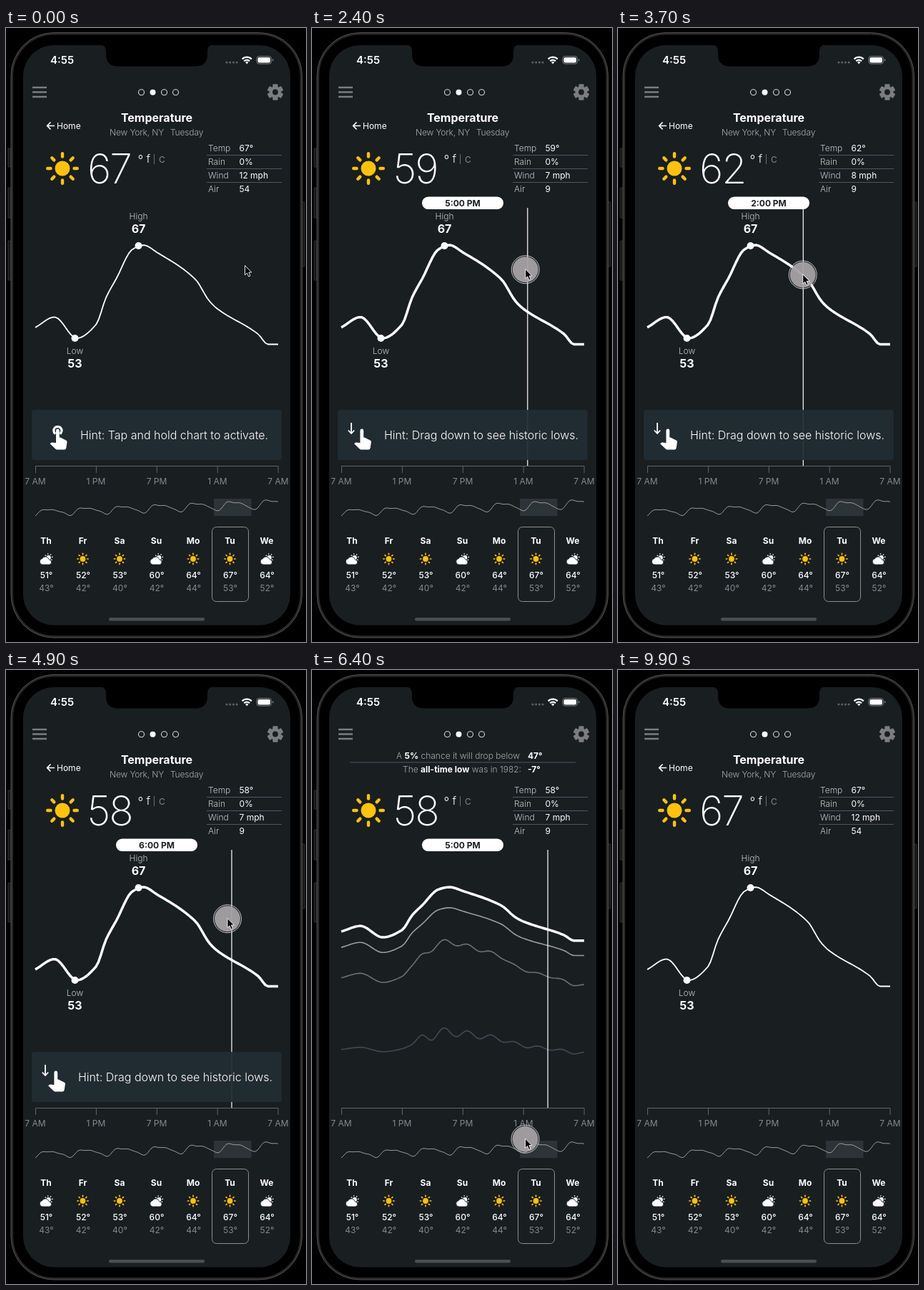
Recreate the animation shown at these times as an HTML page. Size 420 by 857 pixels, loop 10 s.

```html
<!DOCTYPE html>
<html lang="en">
<head>
<meta charset="utf-8">
<title>Weather chart</title>
<style>
  html, body { margin: 0; width: 100%; height: 100%; overflow: hidden; background: #000; }
  svg { display: block; width: 420px; height: 857px; font: 12px Inter, Roboto, sans-serif; fill: #fff; }
  .mid { text-anchor: middle; }
  .end { text-anchor: end; }
  .bold { font-weight: 700; }
  .light { font-weight: 300; }
  .soft { fill: #c4c6c8; }
  .dim { fill: #85898c; }
  .note { fill: #a9acae; font-weight: 300; }
  .line { fill: none; stroke: #fff; stroke-linejoin: round; }
  .rule { stroke: #50565a; }
  .title { font-size: 16px; font-weight: 700; }
  .hint { font-size: 16px; font-weight: 300; }
</style>
</head>
<body>
<svg id="stage" viewBox="0 0 420 857"></svg>
<script>
const LOOP = 10000, STEP = 100;
const LEFT = 41, WIDTH = 340, HOUR = WIDTH / 24, TOP = 303;
const BG = "#191e21";

// Key points of the day's curve: hour, y
const dayKeys = [[0, 418], [1.9, 403.5], [4.1, 433], [6, 414], [7, 376], [8, 350], [9.6, 309], [10.7, 303],
  [12, 313], [15.8, 350.5], [17.2, 381], [18, 392], [22, 427], [23, 441.5], [24, 441.5]];
// Historic lows flatten the day's curve and add a ripple
const lowLines = [
  { base: 330, slope: .485, ripple: 0, color: "#9a9da0" },
  { base: 375, slope: .44, ripple: 4.5, color: "#6b7073" },
  { base: 493, slope: .23, ripple: 7, color: "#43494c" }];
const days = [["Th", 51, 43, true], ["Fr", 52, 42], ["Sa", 53, 40], ["Su", 60, 42, true],
  ["Mo", 64, 44], ["Tu", 67, 53], ["We", 64, 52, true]];
// Pointer moves: start, end, x, y
const moves = [[0, 400, 345, 338], [600, 1300, 329.5, 335.5], [2100, 3200, 161, 341],
  [3200, 4000, 304, 345], [4100, 4500, 310, 346.5], [5100, 6000, 298.5, 654]];

// Motion helpers
const $ = id => document.getElementById(id);
const ramp = (t, a, b) => Math.max(0, Math.min(1, (t - a) / (b - a)));
const smooth = p => p * p * (3 - 2 * p);
const ease = (t, a, b) => smooth(ramp(t, a, b));
const mix = (a, b, p) => a + (b - a) * p;
const set = (id, attrs) => { for (const k in attrs) $(id).setAttribute(k, attrs[k]); };
const fade = (id, opacity) => set(id, { opacity });
const write = (id, s) => { if ($(id).textContent !== s) $(id).textContent = s; };

// Curves
const secant = i => (dayKeys[i + 1][1] - dayKeys[i][1]) / (dayKeys[i + 1][0] - dayKeys[i][0]);
function slopeAt(i) {
  const a = secant(Math.max(0, i - 1)), b = secant(Math.min(dayKeys.length - 2, i));
  return a * b <= 0 ? 0 : 2 * a * b / (a + b);
}
function dayY(hour) {
  const i = Math.max(0, dayKeys.findIndex(key => key[0] >= hour) - 1);
  const [h0, y0] = dayKeys[i], [h1, y1] = dayKeys[i + 1];
  const span = h1 - h0, p = (hour - h0) / span, q = 1 - p;
  return mix(y0, y1, smooth(p)) + span * p * q * (q * slopeAt(i) - p * slopeAt(i + 1));
}
function lowY({ base, slope, ripple }, hour) {
  const wave = Math.cos((hour - 9) * 2 * Math.PI / 2.33) * Math.exp(-ramp(hour, 9, 24) * 1.8);
  return base + slope * (dayY(hour) - TOP) + ripple * wave * ease(hour, 6, 8.5);
}
function weekY(x) {
  const u = (x - LEFT) / WIDTH, a = (x - 55) * 2 * Math.PI / 51.6;
  return 677 - 12 * u - (4.5 + 2 * u) * Math.cos(a + .66 * (Math.cos(a) - 1)) + .6 * Math.sin(x * .36);
}
const plot = (f, from, to, step) => "M" + Array.from({ length: Math.round((to - from) / step) + 1 },
  (_, i) => from + i * step).map(f).join("L");
const plotDay = f => plot(h => [LEFT + h * HOUR, f(h).toFixed(2)], 0, 24, .25);

// Drawing helpers
const text = (x, y, s, cls = "", more = "") => `<text x="${x}" y="${y}" class="${cls}" ${more}>${s}</text>`;
const rect = (x, y, w, h, r, more = "") =>
  `<rect x="${x}" y="${y}" width="${w}" height="${h}" rx="${r}" ${more}/>`;
const circle = (x, y, r, more = "") => `<circle cx="${x}" cy="${y}" r="${r}" ${more}/>`;
const rule = (x1, x2, y) => `<path class="rule" d="M${x1} ${y}H${x2}"/>`;
const list = (n, f) => Array.from({ length: n }, (_, i) => f(i)).join("");

const sun = (x, y, scale) => `<g transform="translate(${x} ${y}) scale(${scale})" fill="#ffc20e">
  ${circle(0, 0, 10.5)}${list(8, i =>
    `<path d="M0 -16.5V-20.8" stroke="#ffc20e" stroke-width="4.4" stroke-linecap="round" transform="rotate(${i * 45})"/>`)}</g>`;

const cloud = (x, y) => `<g transform="translate(${x} ${y})">
  ${circle(3.6, -2.2, 3.2)}${list(5, i =>
    `<path d="M3.6 -6.6V-8.2" stroke="#fff" stroke-width="1.3" transform="rotate(${i * 45 - 55} 3.6 -2.2)"/>`)}
  <path d="M-5 7.5a4.2 4.2 0 0 1-.4-8.3a5.2 5.2 0 0 1 9.6 1.2a3.6 3.6 0 0 1 .6 7.1z" stroke="${BG}" stroke-width=".8"/></g>`;

const hand = (x, y, more = "") => `<g transform="translate(${x} ${y}) scale(1.6)">
  <path d="M10 18.2V7.5a1.5 1.5 0 0 1 3 0v6h.8l5 2.4q1 .5 .9 1.6l-.8 5.2q-.2 1.3-1.4 1.3h-6.8q-.6 0-1-.4L4.8 18.9l.8-.8q.5-.5 1-.3z"/>${more}</g>`;
const touchRing = '<path class="line" stroke-width="2" d="M9.500 10.300A3.500 3.500 0 1 1 13.500 10.300"/>'.replace(/00/g, "");

const gear = (x, y) => `<g transform="translate(${x} ${y})" fill="#7b7d7f">
  ${list(6, i => rect(-3.6, -11.2, 7.2, 8, 1.2, `transform="rotate(${i * 60})"`))}
  ${circle(0, 0, 8.2)}${circle(0, 0, 3.9, `fill="${BG}"`)}</g>`;

const phone = () => `
  <g fill="#171717" stroke="#3c3c3c" stroke-width=".8">
    ${rect(3, 168, 4, 26, 1)}${rect(3, 223, 4, 42, 1)}${rect(3, 297, 4, 55, 1)}${rect(414, 243, 4, 90, 1)}
  </g>
  ${rect(7, 6.5, 407.5, 844.5, 60, 'fill="#282828" stroke="#505050"')}
  ${rect(10, 9.5, 401.5, 838.5, 57, 'fill="#000"')}
  ${rect(24, 24, 374, 809.5, 43, `fill="${BG}"`)}
  <path fill="#000" d="M132 23.5Q140 24 140 32V37Q140 53.5 157 53.5H265Q282 53.5 282 37V32Q282 24 290 23.5Z"/>
  ${text(62, 50, "4:55", "", 'font-size="15" font-weight="600"')}
  ${list(4, i => circle(309 + i * 4.7, 48, 1.6, 'fill="#5c6063"'))}
  <path class="line" stroke-width="2.3" d="M330.6 43.4a9.2 9.2 0 0 1 13.2 0M333.3 46.2a5.5 5.5 0 0 1 7.8 0"/>
  <path d="M335 47.8a3.1 3.1 0 0 1 4.4 0L337.2 50.2z"/>
  ${rect(351, 39.5, 20.5, 10.5, 3.2, 'fill="none" stroke="#7d8183"')}${rect(352.5, 41, 17.5, 7.5, 2)}
  <path d="M373 43v3.6q1.6-.6 1.6-1.8t-1.6-1.8" fill="#7d8183"/>
  <path d="M37 83H57M37 89.5H57M37 96H57" stroke="#7b7d7f" stroke-width="2.4"/>
  ${list(4, i => circle(189.5 + 16 * i, 89.7, 4, i === 1 ? "" : 'fill="none" stroke="#d5d7d8" stroke-width="1.1"'))}
  ${gear(377, 89.5)}
  ${rect(144, 823, 134, 4.5, 2.2, 'fill="#4a4f52"')}`;

const header = () => `
  <path class="line" stroke-width="1.7" d="M68 136.5H57.5M62.5 131.5L57.5 136.5L62.5 141.5"/>
  ${text(71, 140.5, "Home")}
  ${text(211, 131, "Temperature", "mid title")}
  <g letter-spacing="-.15">${text(145, 150, "New York, NY", "note")}${text(230, 150, "Tuesday", "note")}</g>
  ${sun(79, 196, 1)}
  ${text(114, 217.3, "", "", 'id="bigTemp" font-size="57" font-weight="200" letter-spacing="-2"')}
  ${text(184.5, 190, "°", "light", 'font-size="17"')}
  ${text(196.5, 187.5, "f", "light", 'font-size="16"')}
  <path d="M207.5 176V190" stroke="#686d70"/>
  ${text(214, 187.5, "C", "dim")}
  ${["Temp", "Rain", "Wind", "Air"].map((name, i) =>
    text(283, 172 + 19 * i, name, "light soft") + text(326.5, 172 + 19 * i, "", "", `id="cell${i}"`) +
    (i < 3 ? rule(281, 386, 177.5 + 19 * i) : "")).join("")}`;

const history = () => {
  const b = s => `<tspan fill="#fff" font-weight="700">${s}</tspan>`;
  const row = (x, y, s, value) => text(x, y, s, "end note") + text(302, y, value, "bold");
  return `<clipPath id="panelClip">${rect(25, 113, 372, 120, 0)}</clipPath>
  <g clip-path="url(#panelClip)"><g id="panel">
    ${rect(25, 112, 372, 120, 0, `fill="${BG}"`)}
    ${text(211, 131, "Historic Lows", "mid title")}
    ${text(211, 157.5, `At ${b("5:00 PM")} in early November`, "mid note")}${rule(124, 298, 162.5)}
    ${row(291, 176.5, `There is a ${b("10%")} chance it will drop below`, "55°")}${rule(53, 369, 181.5)}
    ${row(291, 195, `A ${b("5%")} chance it will drop below`, "47°")}${rule(53, 369, 199.5)}
    ${row(293, 214, `The ${b("all-time low")} was in 1982:`, "-7°")}
  </g></g>`;
};

const marker = (x, y, name, value, nameY) =>
  circle(x, y, 5) + text(x, nameY, name, "mid light soft") + text(x, nameY + 18.5, value, "mid bold", 'font-size="16"');

const chart = () => `
  <g id="lows" class="line">${lowLines.map((low, i) =>
    `<path id="low${i}" stroke="${low.color}" stroke-width="1.6"/>`).join("")}</g>
  <path id="curve" class="line"/>
  <g id="markers">${marker(185.5, 304, "High", "67", 267)}${marker(96.5, 433, "Low", "53", 455)}</g>
  <g id="probe">
    <path id="probeLine" class="line" stroke-width="1.2" d="M0 251V612"/>
    ${rect(154, 235.5, 114, 17.5, 8.7)}
    ${text(211, 248.7, "", "mid bold", `id="probeTime" fill="${BG}"`)}
  </g>
  <g id="hint">
    ${rect(36, 533, 350, 70, 4, 'fill="#222d34" fill-opacity=".93"')}
    <g id="hintHold">${hand(54, 550, touchRing)}
      ${text(104, 574, "Hint: Tap and hold chart to activate.", "hint")}</g>
    <g id="hintDrag">${hand(51.4, 550)}
      <path class="line" stroke-width="1.8" d="M55 551V565M50.8 561.5L55 566L59.2 561.5"/>
      ${text(101, 574, "Hint: Drag down to see historic lows.", "hint")}</g>
  </g>
  <path class="line" style="stroke:#5f6568" d="M41 611.5H381${list(5, i => `M${41.5 + 84.9 * i} 611.5V621`)}"/>
  ${["7 AM", "1 PM", "7 PM", "1 AM", "7 AM"].map((s, i) => text(41 + 85 * i, 636.5, s, "mid dim")).join("")}
  ${rect(291, 657, 52.5, 24, 0, 'fill="#2c3437"')}
  <path class="line" style="stroke:#a3a6a8" stroke-width=".9" d="${plot(x => [x, weekY(x)], LEFT, LEFT + WIDTH, 2)}"/>`;

const forecast = () => rect(288.5, 696.5, 51, 104, 6, 'fill="none" stroke="#8b8f91"') +
  days.map(([name, high, low, cloudy], i) => {
    const x = 56 + 51.5 * i;
    return text(x, 720, name, "mid bold") + (cloudy ? cloud(x, 741.5) : sun(x, 741, .37)) +
      text(x + .5, 767.5, high + "°", "mid", 'font-weight="500"') + text(x + .5, 785.5, low + "°", "mid dim");
  }).join("");

const pointer = () => `<g id="pointer">
  <g id="press">${circle(0, .7, 18, 'fill="#a6a2a5" fill-opacity=".95"')}
    ${circle(0, .7, 19.5, 'fill="none" stroke="#c9c6c8"')}</g>
  <path d="M0 0V13.2L3 10.4L5.2 15.4L7.5 14.4L5.4 9.5H9.4Z" fill="#000" stroke="#fff" stroke-width=".9"/></g>`;

$("stage").innerHTML = phone() + header() + history() + chart() + forecast() + pointer();

function pointerAt(t) {
  let x = 334.5, y = 331.5;
  for (const [start, end, toX, toY] of moves) {
    const p = ease(t, start, end);
    x = mix(x, toX, p);
    y = mix(y, toY, p);
  }
  return [x, y];
}

// The probe line snaps to whole hours; pulling down fixes it at 5 PM
function drawReadings(t, x) {
  const pulled = t >= 5600, active = t >= 1800 && t < 8100;
  const slot = pulled ? 20 : Math.round((x - 40) / HOUR);
  const hour = pulled ? 17 : slot - 1;
  const since9 = pulled ? 9 : hour - 9;
  const temp = active ? Math.round(66 - since9 * 8 / 9) : 67;
  const wind = active ? Math.round(10 - since9 / 3) : 12;
  write("bigTemp", String(temp));
  [temp + "°", "0%", wind + " mph", active ? "9" : "54"].forEach((s, i) => write("cell" + i, s));
  write("probeTime", `${(hour + 11) % 12 + 1}:00 ${hour < 12 ? "AM" : "PM"}`);
  set("probeLine", { transform: `translate(${46.8 + slot * HOUR} 0)` });
}

function drawChart(t) {
  const stay = 1 - ease(t, 8000, 8500);
  const squeeze = ease(t, 6100, 6400) * stay;
  const spread = squeeze + .066 * (squeeze - ease(t, 6400, 6700)) * stay;
  const mainY = h => TOP + (dayY(h) - TOP) * mix(1, .54, squeeze);
  lowLines.forEach((low, i) => set("low" + i, { d: plotDay(h => mix(mainY(h), lowY(low, h), spread)) }));
  fade("lows", squeeze);
  set("curve", { d: plotDay(mainY), "stroke-width": mix(1.8, 3.5, ramp(t, 1700, 2000) * stay) });
  fade("probe", ramp(t, 1700, 2000) * (1 - ramp(t, 8000, 8300)));
  fade("markers", 1 - ramp(t, 6100, 6300) + ramp(t, 8700, 8900));
}

function draw(time) {
  const t = Math.floor(time % LOOP / STEP) * STEP;
  const [x, y] = pointerAt(t);
  drawReadings(t, x);
  drawChart(t);
  const shown = ease(t, 6160, 6700) * (1 - ease(t, 8000, 8500));
  set("panel", { transform: `translate(0 ${-121 * (1 - shown)})` });
  fade("hint", 1 - ramp(t, 6100, 6300));
  fade("hintHold", 1 - ramp(t, 1700, 2000));
  fade("hintDrag", ramp(t, 1700, 2000));
  set("pointer", { transform: `translate(${x} ${y})`, opacity: 1 - ramp(t, 9000, 9300) });
  fade("press", ramp(t, 1200, 1500) * (1 - ramp(t, 7500, 7700)));
}

const start = performance.now();
(function tick() {
  draw(performance.now() - start);
  requestAnimationFrame(tick);
})();
</script>
</body>
</html>
```
